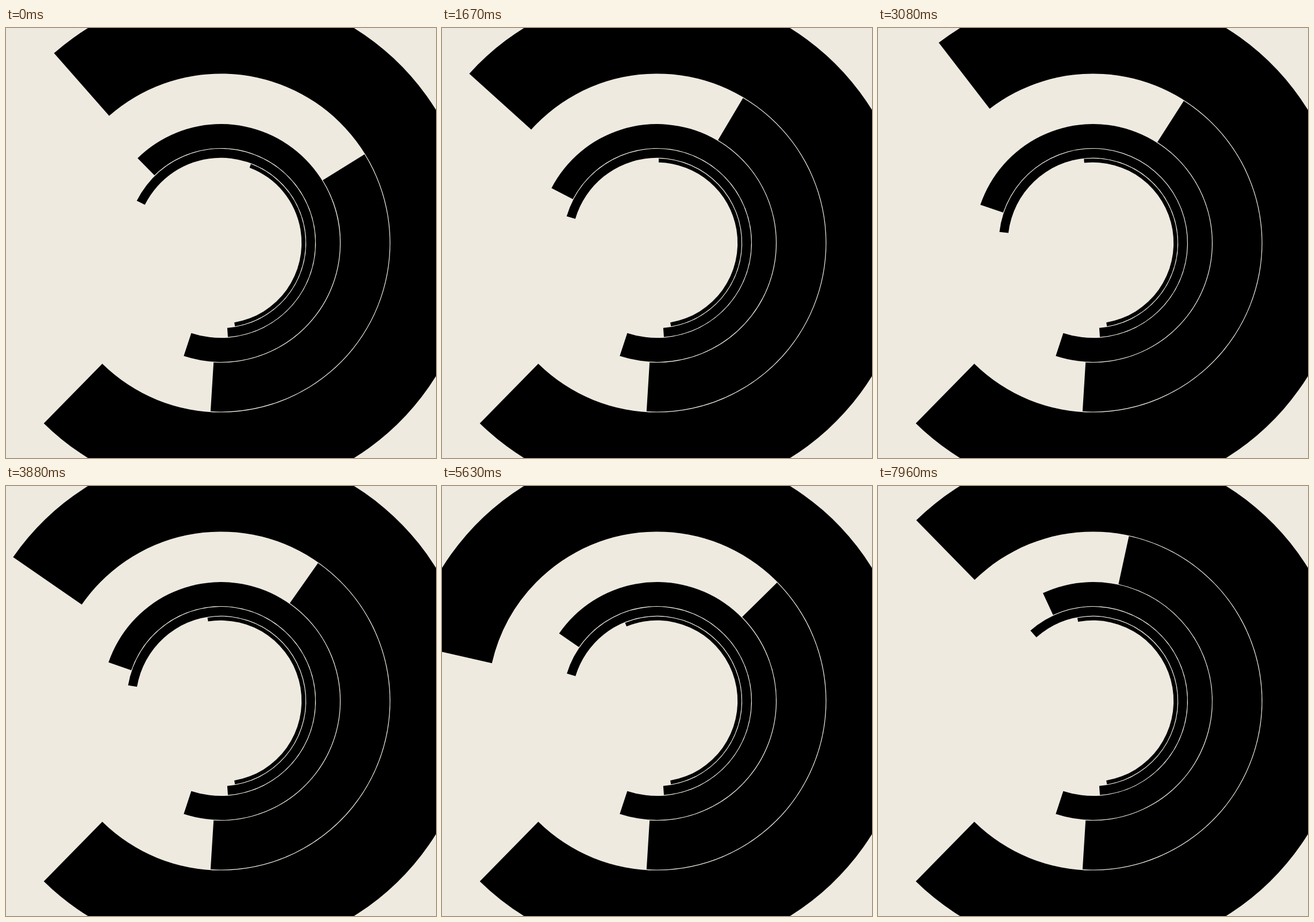
These frames come from a looping animation (748 by 748 pixels, 8000 ms). An HTML page with a canvas:

```html
<!DOCTYPE html>
<html lang="en">
<head>
<meta charset="utf-8">
<title>Concentric arcs</title>
<style>
  html, body { margin: 0; width: 100%; height: 100%; overflow: hidden; background: #eeeae0; }
  canvas { display: block; width: 100vw; height: 100vh; }
</style>
</head>
<body>
<canvas id="stage" width="748" height="748"></canvas>
<script>
const SIZE = 748, MID = SIZE / 2, LOOP = 8000, END = 7.96;
const ctx = document.getElementById('stage').getContext('2d');

// Each ring: radii, fixed end angle, and [seconds, degrees] poses of the moving end,
// measured counterclockwise from the right.
const rings = [
  { inner: 294.6, outer: 439.8, foot: 134.5, poses: [
    [0, 131.36], [0.25, 125], [0.95, 147.1], [1.04, 145.1], [1.5, 133.65], [2, 149.5],
    [2.33, 134.5], [2.62, 122.4], [3.33, 132.2], [3.88, 145.3], [4.17, 148.5],
    [5.63, 167.1], [6.1, 177.3], [6.67, 156], [6.92, 142.37], [7.7, 125.45], [END, 134.35]] },
  { inner: 208.1, outer: 293.4, foot: 93.55, poses: [
    [0, 31.67], [0.35, 42], [0.83, 28.5], [0.97, 21.5], [1.04, 23.58], [1.67, 59.3],
    [2, 68], [2.33, 65.45], [2.85, 54.6], [3.35, 61], [3.88, 54.9], [4.17, 47.3],
    [4.6, 26.4], [5.25, 62.8], [5.63, 44.65], [5.83, 38.5], [6.4, 76.2],
    [6.92, 62.4], [7.52, 50.3], [END, 77.7]] },
  { inner: 165.1, outer: 206.9, foot: 108.25, poses: [
    [0, 134.5], [0.5, 148], [1.04, 144.07], [2.33, 161.5], [3.88, 161.05], [4.6, 166],
    [5.63, 145.4], [6.92, 122.9], [END, 114.9]] },
  { inner: 148.2, outer: 163.9, foot: 85.8, poses: [
    [0, 153.35], [0.5, 170.3], [0.83, 163.9], [1.04, 161.1], [1.67, 163.5], [2.15, 180.7],
    [2.33, 178.6], [3.88, 170.4], [4.17, 182.8], [4.6, 190.2], [5, 185.2],
    [5.63, 163.1], [6.67, 148.2], [6.92, 138.55], [7.5, 136.4], [END, 131.65]] },
  { inner: 140.2, outer: 147, foot: 80.5, poses: [
    [0, 69.25], [1.04, 83], [2.33, 93.3], [3.88, 99.2], [5.63, 112.2], [6.92, 101.6], [END, 100.65]] }
];

const secant = (p, i) => (p[i + 1][1] - p[i][1]) / (p[i + 1][0] - p[i][0]);

// Slopes that never overshoot the poses.
function slopeAt(p, i) {
  if (i === 0) return secant(p, 0);
  if (i === p.length - 1) return secant(p, i - 1);
  const a = secant(p, i - 1), b = secant(p, i);
  return a * b > 0 ? 2 * a * b / (a + b) : 0;
}

function angleAt(p, t) {
  t = Math.min(t, END);
  let i = 0;
  while (i < p.length - 2 && t >= p[i + 1][0]) i++;
  const [t0, v0] = p[i], [t1, v1] = p[i + 1];
  const h = t1 - t0, u = (t - t0) / h, w = 1 - u;
  return v0 * w * w * (1 + 2 * u) + v1 * u * u * (3 - 2 * u)
    + h * u * w * (slopeAt(p, i) * w - slopeAt(p, i + 1) * u);
}

function drawRing(ring, t) {
  const rad = Math.PI / 180;
  const from = -angleAt(ring.poses, t) * rad, to = ring.foot * rad;
  ctx.beginPath();
  ctx.arc(MID, MID, ring.outer, from, to);
  ctx.arc(MID, MID, ring.inner, to, from, true);
  ctx.closePath();
  ctx.fill();
}

function draw() {
  const t = performance.now() % LOOP / 1000;
  ctx.fillStyle = '#eeeae0';
  ctx.fillRect(0, 0, SIZE, SIZE);
  ctx.fillStyle = '#000';
  for (const ring of rings) drawRing(ring, t);
  requestAnimationFrame(draw);
}

draw();
</script>
</body>
</html>
```
